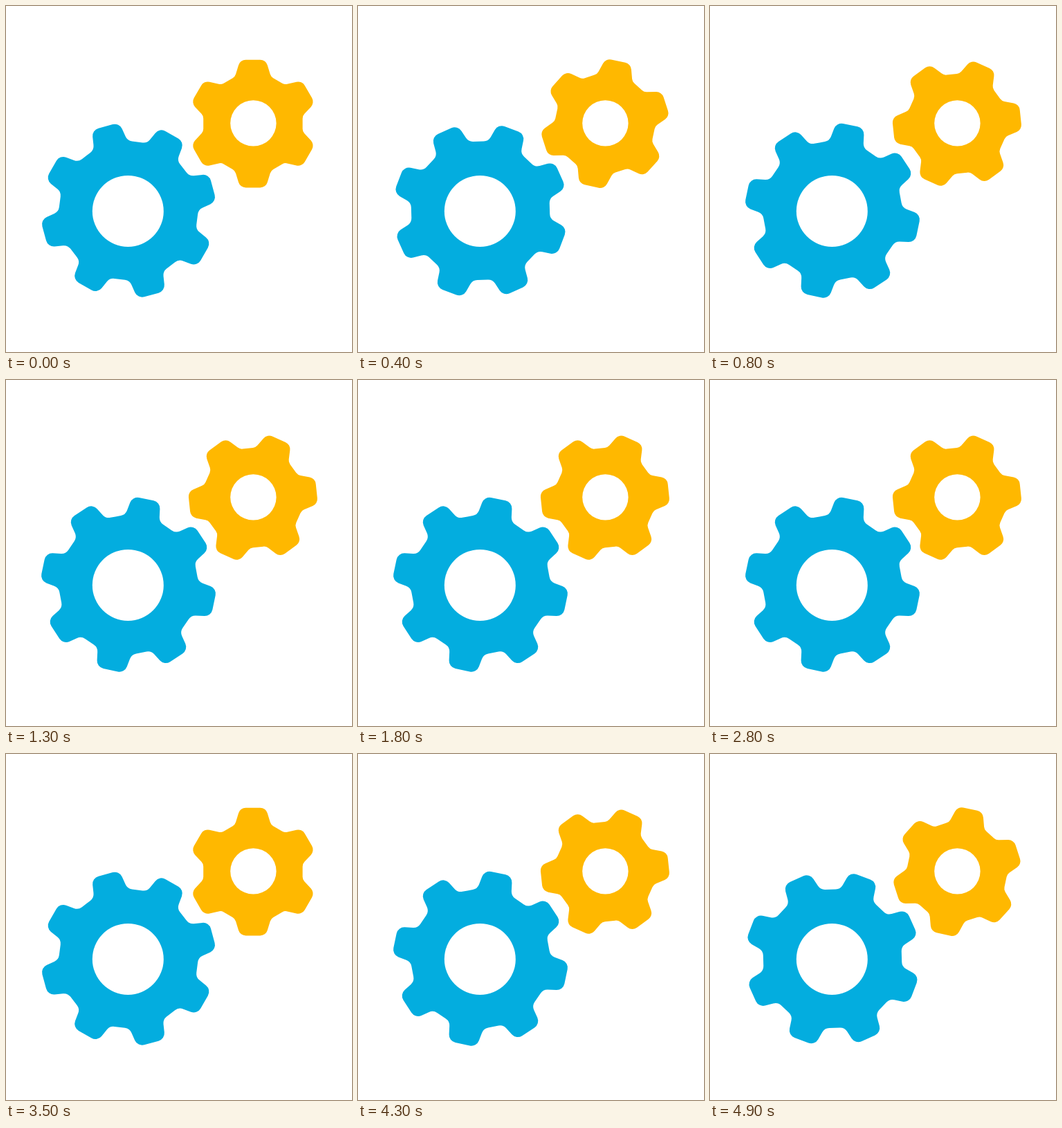
Animation of 500x500 px, one loop 5.01 s. Source, as an HTML page with a canvas:

```html
<!DOCTYPE html>
<html lang="en">
<head>
<meta charset="utf-8">
<title>Gears</title>
<style>
  html, body { margin: 0; width: 100%; height: 100%; overflow: hidden; background: #fff; }
  canvas { display: block; }
</style>
</head>
<body>
<canvas id="stage" width="500" height="500"></canvas>
<script>
const ctx = document.getElementById('stage').getContext('2d');
const LOOP = 5010, STEP = 100, STEPS = 50;

// top and base are half widths of a tooth; turn is in degrees per step
const gears = [
  { x: 177, y: 295.7, teeth: 8, outer: 126.2, inner: 100, top: 20.5, base: 25,
    tip: 11.5, root: 12, start: -15.2, turn: 9, color: '#03addf',
    hole: { x: 176.3, y: 296.4, r: 51.5 } },
  { x: 356.9, y: 170.1, teeth: 6, outer: 92.4, inner: 71.7, top: 18.5, base: 26,
    tip: 11, root: 10, start: 0, turn: -12, color: '#ffb800',
    hole: { x: 357.4, y: 169.4, r: 33.2 } }
];

function outline(g) {
  const half = Math.PI / g.teeth;
  const baseY = -(g.inner - g.base * Math.sin(half)) / Math.cos(half);
  const tooth = [
    [-g.base, baseY, g.root], [-g.top, -g.outer, g.tip],
    [g.top, -g.outer, g.tip], [g.base, baseY, g.root]
  ];
  const points = [];
  for (let i = 0; i < g.teeth; i++) {
    const c = Math.cos(2 * half * i), s = Math.sin(2 * half * i);
    for (const [x, y, r] of tooth) points.push([x * c - y * s, x * s + y * c, r]);
  }
  const path = new Path2D();
  const [a, b] = [points[0], points[points.length - 1]];
  path.moveTo((a[0] + b[0]) / 2, (a[1] + b[1]) / 2);
  points.forEach(([x, y, r], i) => {
    const next = points[(i + 1) % points.length];
    path.arcTo(x, y, next[0], next[1], r);
  });
  path.closePath();
  return path;
}

for (const g of gears) g.path = outline(g);

function drawGear(g, step) {
  ctx.save();
  ctx.translate(g.x, g.y);
  ctx.rotate((g.start + g.turn * step) * Math.PI / 180);
  ctx.fillStyle = g.color;
  ctx.fill(g.path);
  ctx.restore();
  ctx.fillStyle = '#fff';
  ctx.beginPath();
  ctx.arc(g.hole.x, g.hole.y, g.hole.r, 0, 2 * Math.PI);
  ctx.fill();
}

const begin = performance.now();

function frame() {
  const t = (performance.now() - begin) % LOOP;
  const step = Math.min(STEPS - 1, Math.floor(t / STEP)) % 5;
  ctx.fillStyle = '#fff';
  ctx.fillRect(0, 0, 500, 500);
  for (const g of gears) drawGear(g, step);
  requestAnimationFrame(frame);
}
frame();
</script>
</body>
</html>
```
